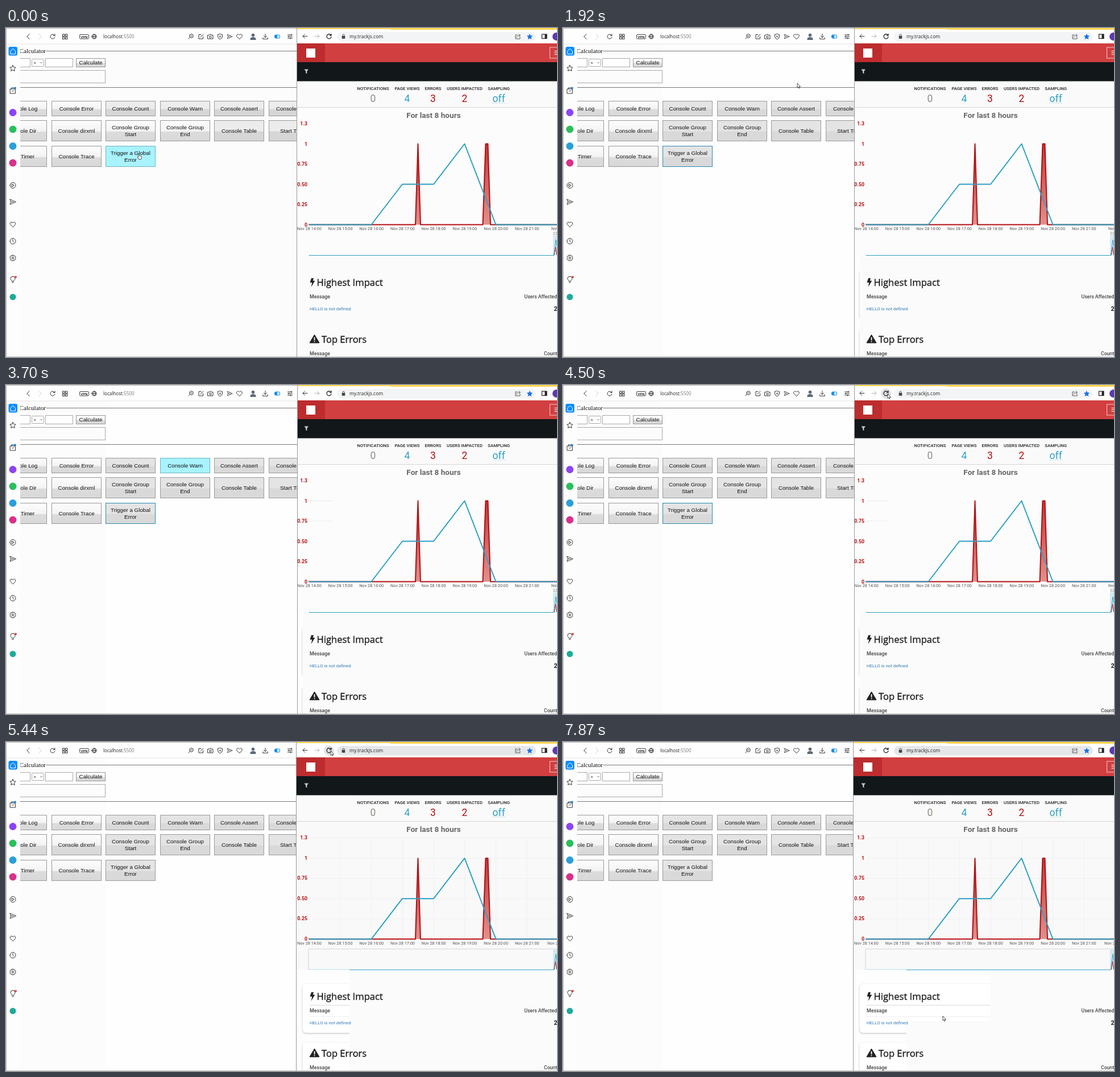
An HTML page for the animation above (8 s loop, 969 by 578 pixels).

```html
<!DOCTYPE html>
<html lang="en">
<head>
<meta charset="utf-8">
<title>Error monitoring demo</title>
<style>
html, body { margin: 0; width: 100%; height: 100%; overflow: hidden; background: #fcfcfc; }
svg { display: block; width: 969px; height: 578px; }
text { white-space: pre; }
.arial { font-family: "Liberation Sans", Arial, sans-serif; }
.times { font-family: "Liberation Serif", Times, serif; }
.rob { font-family: Roboto, sans-serif; }
.open { font-family: "Open Sans", sans-serif; }
.title { stroke: #222; stroke-width: .4px; }
.bold { font-weight: 700; }
.med { font-weight: 500; }
.mid { text-anchor: middle; }
.end { text-anchor: end; }
.line { fill: none; stroke-linecap: round; stroke-linejoin: round; }
.card { fill: #fff; filter: drop-shadow(0 1.5px 1.5px #0004); }
#top { stop-color: var(--top); }
#low { stop-color: var(--low); }
</style>
</head>
<body>
<svg id="stage" viewBox="0 0 969 578" xmlns="http://www.w3.org/2000/svg"></svg>
<script>
const stage = document.getElementById('stage');
const BLUE = '#2fa0c4', RED = '#b30f12', INK = '#333';

const rect = (x, y, w, h, fill, more = '') =>
  `<rect x="${x}" y="${y}" width="${w}" height="${h}" fill="${fill}" ${more}/>`;
const text = (x, y, str, size, fill, cls) =>
  `<text x="${x}" y="${y}" font-size="${size}" fill="${fill}" class="${cls}">${str}</text>`;
const path = (d, color = INK, width = 1, more = '') =>
  `<path d="${d}" class="line" stroke="${color}" stroke-width="${width}" ${more}/>`;
const icon = (x, y, d, color = INK, width = 1) =>
  `<g transform="translate(${x} ${y})">${path(d, color, width)}</g>`;
const dot = (x, y, r, fill) => `<circle cx="${x}" cy="${y}" r="${r}" fill="${fill}"/>`;
const group = (id, body, more = '') => `<g id="${id}" ${more}>${body}</g>`;

const ring = r => `M${-r} 0a${r} ${r} 0 1 0 ${2 * r} 0a${r} ${r} 0 1 0 ${-2 * r} 0`;
const shape = {
  heart: 'M0 4.5L-4.3 .3C-6.5 -2.5 -2.6 -6 0 -2.6C2.6 -6 6.5 -2.5 4.3 .3Z',
  send: 'M-5 -4.5L5.5 0L-5 4.5L-3.4 0ZM-3.4 0H1',
  reload: 'M3.7 -1.7A4 4 0 1 0 4 1M4 -4.3V-1.5H1.2',
  stop: 'M-3.4 -3.4L3.4 3.4M3.4 -3.4L-3.4 3.4',
  back: 'M4 0H-4M-.4 -3.7L-4 0L-.4 3.7',
  star: 'M0 -5L1.6 -1.7L5.2 -1.2L2.6 1.3L3.2 5L0 3.2L-3.2 5L-2.6 1.3L-5.2 -1.2L-1.6 -1.7Z',
  share: 'M-1 -3H-4V4H4V1M-2 1.5C-1.5 -1 0 -2 4 -2M2 -4.5L4.5 -2L2 .5'
};

/* ---- left window ---- */
const names = [
  ['Console Log', 'Console Error', 'Console Count', 'Console Warn', 'Console Assert', 'Console Clear'],
  ['Console Dir', 'Console dirxml', 'Console Group|Start', 'Console Group|End', 'Console Table', 'Start Timer'],
  ['End Timer', 'Console Trace', 'Trigger a Global|Error']
];
const rows = [[128.5, 26], [162.5, 36], [207.5, 36]];

function button(label, col, row) {
  const [y, h] = rows[row], x = Math.floor(-15.6 + col * 95.6) + .5;
  const lines = label.split('|'), base = y + h / 2 + 3.4 - (lines.length - 1) * 5.6;
  return rect(x, y, 87, h, col < 2 ? 'url(#pale)' : 'url(#face)', `stroke="#999" id="b${row}${col}"`) +
    lines.map((s, i) => text(x + 43.5, base + i * 11.2, s, 9.8, '#111', 'arial mid')).join('');
}

const page = rect(0, 0, 514, 578, '#fcfcfc') +
  rect(175, 28, 338, 550, '#fefefe', 'id="wash"') +
  path('M71 40.5H514M25 104.5H514', '#777') +
  text(23.5, 44, 'Calculator', 11.2, '#111', 'times') +
  rect(-10, 53.5, 52.5, 15, '#fff', 'stroke="#aaa"') +
  rect(45.5, 54.5, 21, 13, '#fff', 'stroke="#aaa" rx="1"') +
  text(48.5, 64, '+', 8, '#111', 'arial') + icon(62, 61, 'M-1.5 -.7L0 .8L1.5 -.7', INK, .7) +
  rect(69.5, 53.5, 48, 15, '#fff', 'stroke="#aaa"') +
  rect(123.5, 53.5, 51, 15, 'url(#pale)', 'stroke="#999"') +
  text(149, 64.4, 'Calculate', 9.8, '#111', 'arial mid') +
  rect(-10, 74.5, 184.5, 22, '#fcfcfc', 'stroke="#aaa"') +
  names.map((list, r) => list.map((s, c) => button(s, c, r)).join('')).join('');

const side = rect(0, 28, 25, 550, '#fdfdfd') +
  rect(4.5, 33, 15.5, 15.5, '#0a8cff', 'rx="3"') +
  icon(12.2, 41, 'M-4.3 4.3V-.5L0 -4.7L4.3 -.5V4.3Z', '#fff') +
  icon(12, 70.5, shape.star) +
  icon(12, 110, 'M-4.5 -3H4.5V5H-4.5ZM-2.5 -3V-5H2.5V-3M-1.5 0L0 1.5L2 -.5') + dot(16, 105.5, 2, '#1a8fe8') +
  dot(12, 148.5, 6.5, '#8b45f5') + dot(12, 178, 6.5, '#2bbf5c') +
  dot(12, 207.5, 6.5, '#2b9fd9') + dot(12, 237, 6.5, '#d9308a') +
  icon(12, 276.5, ring(5) + 'M-1.5 -2.3L2.4 0L-1.5 2.3Z') +
  icon(12, 305.5, shape.send) + icon(12, 345, shape.heart) +
  icon(12, 374.5, ring(5) + 'M0 -3V0L2 1.6') +
  icon(12, 404, ring(1.6) + 'M-1.2 -5H1.2L1.8 -3.4L3.6 -3.8L5 -1.6L4 0L5 1.6L3.6 3.8L1.8 3.4L1.2 5H-1.2L-1.8 3.4L-3.6 3.8L-5 1.6L-4 0L-5 -1.6L-3.6 -3.8L-1.8 -3.4Z') +
  icon(12, 442, 'M-1.7 2.5C-1.7 1 -4 .5 -4 -1.7A4 4 0 0 1 4 -1.7C4 .5 1.7 1 1.7 2.5ZM-1.5 5H1.5') +
  dot(17, 437.5, 2, '#ef3b35') + dot(12, 472.5, 5.5, '#1fa99a');

const bar = rect(0, 0, 514, 28, '#fefefe') + path('M0 28H514', '#e4e4e4') +
  icon(39, 15, 'M2.3 -4.5L-2.3 0L2.3 4.5') + icon(60, 15, 'M-2.3 -4.5L2.3 0L-2.3 4.5', '#d0d0d0') +
  icon(82, 15, shape.reload) +
  [[99.5, 11], [104.5, 11], [99.5, 16], [104.5, 16]].map(([x, y]) => rect(x, y, 3.4, 3.4, 'none', `stroke="${INK}"`)).join('') +
  rect(129.5, 11.5, 16, 7.5, '#fff', 'stroke="#444" rx="1.5"') +
  text(137.5, 17.6, 'VPN', 6, '#222', 'arial bold mid') +
  icon(155, 15, ring(4) + 'M-4 0H4M0 -4C-2.6 -2 -2.6 2 0 4C2.6 2 2.6 -2 0 -4') +
  `<text x="171" y="17.8" font-size="8.1" class="open" fill="#222">localhost<tspan fill="#777">:5500</tspan></text>` +
  icon(326, 14, ring(3.3) + 'M-2.4 2.4L-5 5M-1.2 0H1.2') +
  icon(343, 15, 'M0 -3.5H-4V4H3.5V0M-1 1L4 -4') +
  icon(359.5, 15, 'M-4.5 -2.5H-2L-1 -4H1L2 -2.5H4.5V4H-4.5ZM-1.7 .7a1.7 1.7 0 1 0 3.4 0a1.7 1.7 0 1 0 -3.4 0') +
  icon(376.5, 15, 'M-4 -3.5L0 -4.5L4 -3.5V0C4 2.5 2 4 0 4.7C-2 4 -4 2.5 -4 0ZM-1.4 -1.4L1.4 1.4M1.4 -1.4L-1.4 1.4') +
  `<g transform="translate(393.5 15) scale(.85)">${path(shape.send)}</g>` + icon(410.5, 15, shape.heart) +
  dot(434.5, 12.6, 2.8, '#5e6b78') + '<path d="M429.5 21V19C429.5 15 439.5 15 439.5 19V21Z" fill="#5e6b78"/>' +
  icon(456, 15, 'M0 -4.5V1.5M-2.7 -1L0 1.7L2.7 -1M-4.3 2V4.3H4.3V2') +
  rect(472.5, 12, 9, 6, '#d9efff', 'stroke="#168de2" rx="2"') + rect(473, 12.5, 4, 5, '#168de2') +
  icon(499.5, 15, 'M-4 -3H4M-4 0H4M-4 3H4M2 -4V-2M-2 -1V1M1 2V4') +
  path('M.5 578V.5H514', '#b5b5b5') + path('M0 577.5H514', '#c4c4c4');

/* ---- right window ---- */
const ticks = [...Array(8).keys()].map(i => 533.4 + i * 54.7);
const levels = [['1.3', 168], ['1', 203.5], ['0.75', 239], ['0.50', 274.5], ['0.25', 310], ['0', 345.5]];

function chart(fresh) {
  const redLine = 'M533 345.5H720L724.5 203.5L729 345.5H838.5L843.5 203.5H847.5L852 345.5H970';
  const grid = ticks.slice(1).map(x => `M${x} 168V345`).join('') +
    levels.slice(0, 5).map(l => `M533 ${l[1]}H970`).join('');
  return rect(511, 140, 458, 260, fresh ? '#f9f9f9' : '#fcfcfc') +
    `<g transform="translate(0 ${fresh ? .7 : 0})">` +
    (fresh ? path(grid, '#f0f0f0') + path('M532 399V363H970', '#d4d4d4') : '') +
    rect(962, 364, 8, 35, '#d3e8f0') +
    `<path d="${redLine}Z" fill="url(#heat)"/>` + path(redLine, RED, 2) +
    path('M533 345.5H642.5L697 274.5H752L806.5 203.5L861.5 345.5H970', BLUE, 2) +
    path('M964 399L966.5 385L969 399', RED, 1) + path('M533 399.5H963.5L967 372L970 390', BLUE, 1) +
    ticks.map((x, i) => text(x, 355.3, `Nov 28 ${14 + i}:00`, 7.3, '#555', 'rob mid')).join('') +
    (fresh ? text(952, 355.3, 'Nov 28 22:00', 7.3, '#555', 'rob')
      : text(959, 355.3, 'Nov', 7.3, '#555', 'rob') + text(962, 362.5, '22', 7, '#777', 'rob')) + '</g>' +
    levels.map(([s, y]) => text(530, y + 3, s, 8.8, RED, 'rob bold end')).join('');
}

const cards = rect(511, 400, 458, 178, '#fefefe') +
  '<rect x="521.5" y="425" width="470" height="86" rx="6" class="card"/>' +
  '<rect x="521.5" y="528" width="470" height="90" rx="6" class="card"/>' +
  path('M534 462.5H970', '#d9d9d9') + path('M534 482.5H970', '#eeeeee');

const impact = '<path d="M537 439.5H541L539.8 444H543.3L536.8 455L538.2 447.3H534.5Z" fill="#222"/>' +
  text(546.5, 452.5, 'Highest Impact', 16.6, '#222', 'open title') +
  text(534, 475, 'Message', 8.8, '#444', 'rob med') +
  text(969, 474.5, 'Users Affected', 8.6, '#444', 'rob med end') +
  text(534, 495.5, 'HELLO is not defined', 7.85, '#337ab7', 'rob') +
  text(963.5, 496.5, '2', 10.5, '#222', 'rob bold') +
  '<path d="M542.5 539.5L550.5 553H534.5Z" fill="#222" stroke="#222" stroke-width="1.5" stroke-linejoin="round"/>' +
  path('M542.5 544V548M542.5 551V551.1', '#fff', 1.8) +
  text(555, 552.5, 'Top Errors', 16.5, '#222', 'open title') +
  text(534, 574.8, 'Message', 8.8, '#444', 'rob med') +
  text(969, 574.8, 'Count', 8.6, '#444', 'rob med end');

const stats = [['NOTIFICATIONS', 645.5, '0', '#8d8d84'], ['PAGE VIEWS', 705.5, '4', BLUE], ['ERRORS', 751, '3', RED],
  ['USERS IMPACTED', 806.5, '2', RED], ['SAMPLING', 866.7, 'off', BLUE]];
const head = rect(511, 93, 458, 46, '#fafafa') + path('M511 139.5H970', '#d6d6d6') +
  stats.map(([s, x, n, c]) => text(x, 109.2, s, 7.75, '#222', 'rob med mid') +
    text(x, 130, n, 17.5, c, 'rob mid')).join('') +
  path('M856 131.8H878', '#8cc8dc', .7, 'stroke-dasharray="1 2"') +
  text(752, 158.2, 'For last 8 hours', 13.6, '#666', 'rob bold mid');

const nav = rect(511, 0, 458, 28, '#fff') + rect(511, 0, 165, 2, '#fbd650') + rect(676, 0, 293, 3, '#fbd650') +
  rect(582, 7, 350, 16.5, '#f1f3f4', 'rx="8.2" id="pill"') +
  dot(568, 15, 9, '#dfe1e4').replace('<circle', '<circle id="halo"') +
  icon(526, 14.5, shape.back) + icon(547, 14.5, 'M-4 0H4M.4 -3.7L4 0L.4 3.7', '#b4b4b4') +
  group('reload', icon(568, 14.7, shape.reload, '#222', 1.3)) + group('stop', icon(568, 15, shape.stop, '#222', 1.3)) +
  rect(590.7, 14, 5.6, 4.8, '#444', 'rx=".6"') + icon(593.5, 14, 'M-1.6 0V-1.2A1.6 1.6 0 0 1 1.6 -1.2V0', '#444') +
  text(604, 18, 'my.trackjs.com', 8.5, '#222', 'open') +
  icon(900, 15, shape.share, '#555') +
  `<path d="${shape.star}" transform="translate(921 15)" fill="#1a73e8"/>` +
  rect(942.5, 11, 8.5, 7.5, '#fff', 'stroke="#222" stroke-width="1.2"') + rect(947.5, 11, 3.5, 7.5, '#222') +
  dot(968, 15, 7, '#5c3bb0') +
  rect(511, 27, 458, 33, '#d13f40') + rect(511, 27, 50, 33, '#bd2c2e') + rect(528, 36, 16, 16, '#fff') +
  rect(956.5, 34, 20, 19, 'none', 'stroke="#f3c9c9"') + path('M965 40.5H972M965 43.5H972M965 46.5H972', '#fff', 1.2) +
  rect(511, 60, 458, 33.5, '#121719') + '<path d="M524.5 72.5H532L529.3 76V80.5L527.2 79V76Z" fill="#ccc"/>';

const patch = path('M533 203.5H573M533 239H573', '#eee');

stage.innerHTML = `<defs>
  <linearGradient id="pale" x2="0" y2="1"><stop offset=".1" stop-color="#fbfbfb"/><stop offset=".52" stop-color="#f3f3f3"/><stop offset=".56" stop-color="#dcdcdc"/><stop offset="1" stop-color="#d8d8d8"/></linearGradient>
  <linearGradient id="face" x2="0" y2="1"><stop id="top" offset=".5"/><stop id="low" offset=".56"/></linearGradient>
  <linearGradient id="heat" x2="0" y2="1"><stop stop-color="#c23a38"/><stop offset="1" stop-color="#e0908d"/></linearGradient>
  <clipPath id="seen"><rect id="seenA" x="511" y="400" height="178"/><rect id="seenB" x="563" y="406" height="84"/></clipPath>
  <clipPath id="paneClip"><rect id="pane" height="578"/></clipPath></defs>` +
  rect(511, 0, 458, 578, '#fbfbfb') + rect(511, 140, 458, 260, '#fefefe') +
  group('old', chart(false)) + group('fresh', chart(true)) +
  group('patch', patch, 'style="mix-blend-mode:multiply"') +
  group('cards', cards, 'clip-path="url(#seen)"') + impact + head + nav +
  path('M511 577.5H970', '#ccc') +
  group('left', page + side + bar, 'clip-path="url(#paneClip)"') +
  '<rect id="edge" width="1" height="578" fill="#999"/>' +
  group('arrow', '<path d="M0 0V8L1.8 6.4L3 9L4.2 8.4L3.1 6H5.5Z" fill="#fff" stroke="#222" stroke-width=".8"/>') +
  group('hand', '<path d="M-1 .8C-1 -.3 .6 -.3 .6 .8V4L4 4.7C4.8 5 4.8 6 4.4 7.2L3.6 10H-.3L-2.8 6.4C-3 5.4 -2 5.2 -1 6.2Z" fill="#fff" stroke="#222" stroke-width=".8"/>') +
  group('beam', path('M-1.5 0H1.5M0 0V8M-1.5 8H1.5', '#333', .8));

/* ---- timeline: each step changes part of the state ---- */
const TRIGGER = 'b22', GROUP_START = 'b12', GROUP_END = 'b13', WARN = 'b03';
const steps = [
  [0, { edge: 512, focus: false, wash: false, hot: TRIGGER, press: false, chart: 'old', seen: 0, more: 0,
    patch: false, halo: false, stop: false, pill: '#f3f4f5', cursor: ['hand', 234, 220.5] }],
  [1070, { edge: 513, focus: true, wash: true, seen: 11 }],
  [1600, { press: true }],
  [1790, { press: false, hot: GROUP_END, cursor: ['hand', 302, 184] }],
  [1920, { hot: '', cursor: ['arrow', 412, 97] }],
  [2050, { cursor: [] }],
  [2450, { cursor: ['arrow', 566, 11] }],
  [2590, { cursor: ['arrow', 560, 18] }],
  [2720, { cursor: ['arrow', 535, 35] }],
  [2870, { hot: GROUP_END, cursor: ['hand', 325, 187] }],
  [3010, { cursor: ['hand', 270, 192.5] }],
  [3140, { hot: TRIGGER, patch: true, cursor: ['hand', 241, 216] }],
  [3260, { cursor: ['hand', 234, 220.5] }],
  [3560, { press: true }],
  [3700, { press: false, hot: WARN, cursor: [] }],
  [3840, { hot: '' }],
  [4100, { cursor: ['beam', 590, 8] }],
  [4240, { cursor: ['arrow', 577, 14] }],
  [4380, { halo: true, cursor: ['arrow', 571, 15.5] }],
  [4510, { edge: 511, focus: false, patch: false, seen: 93 }],
  [4980, { chart: '', pill: '#e6e7e9' }],
  [5110, { chart: 'fresh' }],
  [5280, { stop: true }],
  [5440, { stop: false }],
  [6420, { cursor: ['arrow', 568, 15.5] }],
  [7290, { stop: true }],
  [7410, { chart: '', stop: false }],
  [7560, { chart: 'fresh', halo: false, cursor: ['arrow', 642, 152] }],
  [7710, { cursor: ['arrow', 662, 320] }],
  [7870, { more: 189, cursor: ['arrow', 668, 481.5] }]
];

const el = id => document.getElementById(id);
const show = (id, on) => el(id).style.display = on ? '' : 'none';
const set = (id, name, value) => el(id).setAttribute(name, value);

function draw(s) {
  stage.style.setProperty('--top', s.wash ? '#e4e4e4' : '#ececec');
  stage.style.setProperty('--low', s.wash ? '#d9d9d9' : '#d6d6d6');
  set('pane', 'width', s.edge);
  set('edge', 'x', s.edge - 1);
  set('seenA', 'width', s.seen);
  set('seenB', 'width', s.more);
  set('pill', 'fill', s.pill);
  for (const id of [TRIGGER, GROUP_START, GROUP_END, WARN]) {
    const hot = s.hot === id, grouped = id === GROUP_START || id === GROUP_END;
    const rest = grouped && !s.wash ? 'url(#pale)' : 'url(#face)';
    set(id, 'fill', hot ? (s.press ? '#98ecfa' : '#a8f3ff') : rest);
    set(id, 'stroke', id === TRIGGER && s.focus ? '#2a8bb0' : hot ? '#6fb3c0' : '#999');
  }
  for (const id of ['old', 'fresh']) show(id, s.chart === id);
  for (const id of ['wash', 'patch', 'halo', 'stop']) show(id, s[id]);
  show('reload', !s.stop);
  const [kind, x, y] = s.cursor;
  for (const id of ['arrow', 'hand', 'beam']) show(id, id === kind);
  if (kind) set(kind, 'transform', `translate(${x} ${y})`);
}

let last = -1;
function tick(now) {
  const t = now % 8000;
  const index = steps.filter(([at]) => at <= t).length;
  if (index !== last) {
    draw(Object.assign({}, ...steps.slice(0, index).map(([, change]) => change)));
    last = index;
  }
  requestAnimationFrame(tick);
}
tick(performance.now());
</script>
</body>
</html>
```
